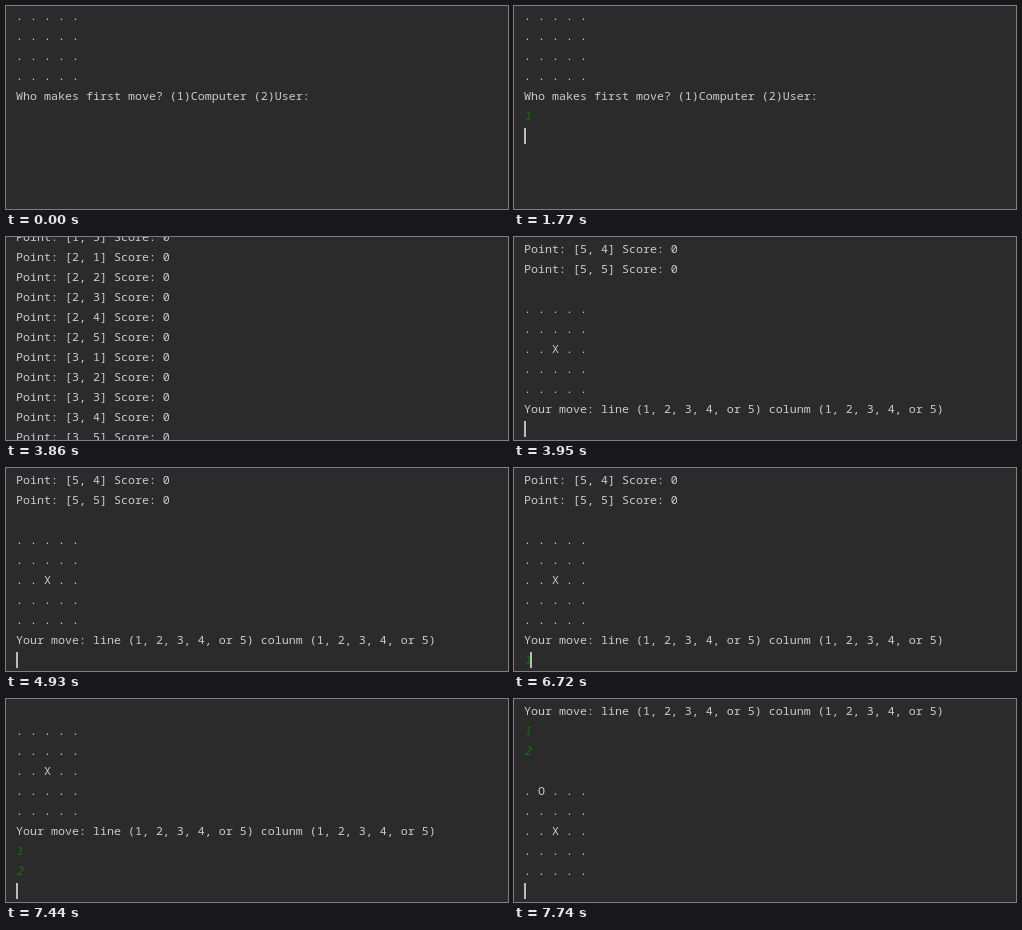
An HTML page with a canvas for the animation above (8000 ms loop, 502 px wide and 203 px high).

```html
<!DOCTYPE html>
<html lang="en">
<head>
<meta charset="utf-8">
<title>Console game</title>
<style>
html, body { margin: 0; height: 100%; overflow: hidden; background: #2b2b2b; }
canvas { display: block; }
</style>
</head>
<body>
<canvas width="502" height="203"></canvas>
<script>
const ctx = document.querySelector('canvas').getContext('2d', { alpha: false });
const LOOP = 8000, LEFT = 10, CHAR = 7, LINE = 20;
const BLINK = 985, VIEW_BOTTOM = 184;
const FONT = '11.667px "Noto Sans Mono", monospace';

const empty = '. . . . .\n';
const board = first => first + empty + '. . X . .\n' + empty.repeat(2);
const points = Array.from({ length: 25 }, (_, i) =>
  `Point: [${Math.floor(i / 5) + 1}, ${i % 5 + 1}] Score: 0\n`).join('');

// What reaches the console, and when; the empty entry is a click that shows the caret.
const session = [
  { at: 0, text: empty.repeat(4) + 'Who makes first move? (1)Computer (2)User:\n' },
  { at: 460, text: '' },
  { at: 840, text: '1' },
  { at: 1770, text: '\n' },
  { at: 3860, text: points + '\n' + board(empty) +
    'Your move: line (1, 2, 3, 4, or 5) colunm (1, 2, 3, 4, or 5)\n' },
  { at: 6720, text: '1' },
  { at: 7040, text: '\n' },
  { at: 7190, text: '2' },
  { at: 7440, text: '\n' },
  { at: 7670, text: '\n' + board('. O . . .\n') }
];

const linesOf = entries => entries.map(e => e.text).join('').split('\n');
const rowTop = row => 2 + row * LINE;
// The view follows the caret once it passes the bottom.
const scrollFor = lines => Math.max(0, rowTop(lines.length - 1) - VIEW_BOTTOM);

function draw(time) {
  const past = session.filter(e => e.at <= time);
  const last = past.at(-1);
  const idle = time - last.at;
  const lines = linesOf(past);

  // A block of output is briefly seen part of the way through its scroll.
  let scroll = scrollFor(lines);
  if (last.text.length > 1 && idle < 70) {
    const before = scrollFor(linesOf(past.slice(0, -1)));
    scroll = Math.round(before + (scroll - before) * 0.363);
  }

  ctx.fillStyle = '#2b2b2b';
  ctx.fillRect(0, 0, 502, 203);

  lines.forEach((text, row) => {
    const typed = text.length === 1;
    ctx.font = (typed ? 'italic ' : '') + FONT;
    ctx.fillStyle = typed ? '#007f00' : '#cccccc';
    ctx.fillText(text, LEFT, rowTop(row) - scroll + 12);
  });

  // Input and output keep the caret lit for a while.
  const lit = idle < BLINK / 2 || time % BLINK < BLINK / 2;
  if (past.length > 1 && lit) {
    const x = Math.max(LEFT, LEFT + lines.at(-1).length * CHAR - 1);
    ctx.fillStyle = '#bbbbbb';
    ctx.fillRect(x, rowTop(lines.length - 1) - scroll, 2, 16);
  }
}

const start = performance.now();
function tick() {
  draw((performance.now() - start) % LOOP);
  requestAnimationFrame(tick);
}
tick();
</script>
</body>
</html>
```
